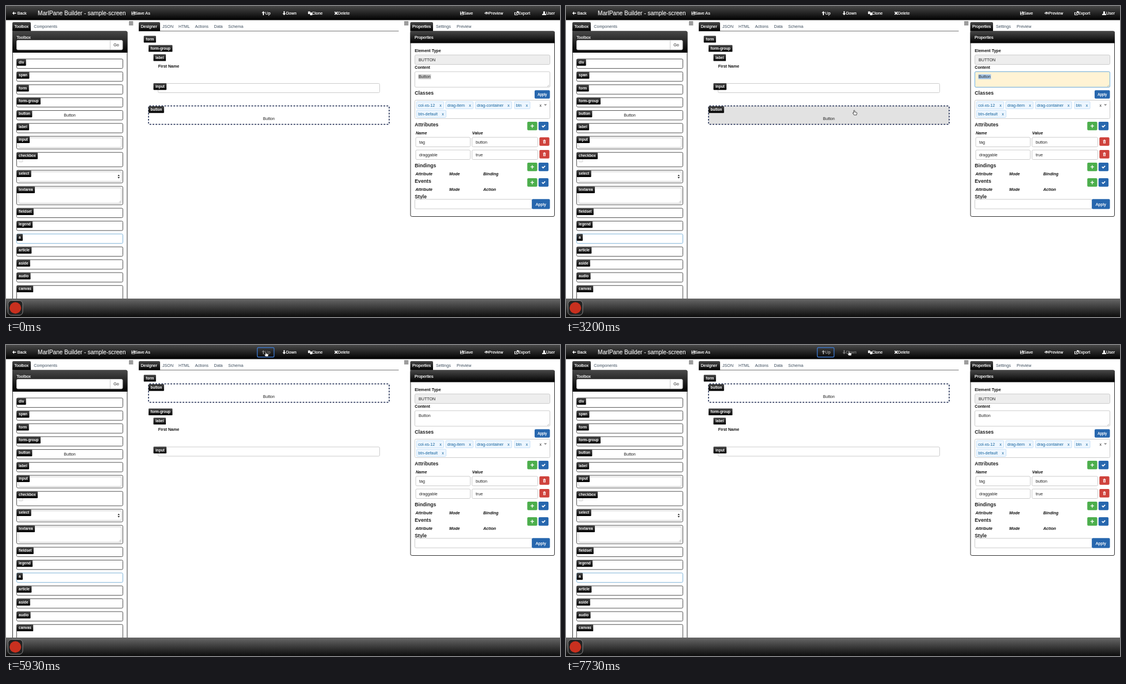
Write an HTML page that moves like this. It is 960 px wide and 540 px high and loops after 8 s.

```html
<!DOCTYPE html>
<html lang="en">
<head>
<meta charset="utf-8">
<title>Screen designer</title>
<style>
html, body { margin: 0; width: 100%; height: 100%; overflow: hidden; background: #fff; }
svg { display: block; width: 960px; height: 540px; }
text { font: 7.15px "Liberation Sans", Arial, sans-serif; fill: #222; white-space: pre; }
.white { fill: #fff; stroke: #fff; stroke-width: .2px; }
.title { font-size: 10.1px; fill: #fff; stroke: #fff; stroke-width: .1px; }
.tab { fill: #3c4c5c; }
.bold { font-weight: bold; font-size: 7.05px; fill: #111; }
.head { font-weight: bold; font-size: 8.7px; }
.col { font: italic bold 7.1px "Liberation Sans", Arial, sans-serif; fill: #111; }
.tag { font: bold 6.4px "Liberation Sans", Arial, sans-serif; fill: #fff; }
.chip { fill: #14639c; }
.mid { text-anchor: middle; }
.small { font-size: 6.4px; }
</style>
</head>
<body>
<svg id="stage" viewBox="0 0 960 540"></svg>
<script>
const pen = document.createElement('canvas').getContext('2d');
pen.font = 'bold 6.4px "Liberation Sans", Arial, sans-serif';

const text = (x, y, s, cls = '') => `<text x="${x}" y="${y}" class="${cls}">${s}</text>`;
const rect = (x, y, w, h, fill, stroke = 'none', r = 0, more = '') =>
  `<rect x="${x}" y="${y}" width="${w}" height="${h}" rx="${r}" fill="${fill}" stroke="${stroke}" ${more}/>`;
const path = (d, fill = 'none', stroke = 'none', more = '') =>
  `<path d="${d}" fill="${fill}" stroke="${stroke}" ${more}/>`;
const field = (x, y, w, h, fill = '#fff') => rect(x, y, w, h, fill, '#ccc', 2);
const group = (id, body, more = '') => `<g id="${id}" ${more}>${body}</g>`;
const dashed = (x, y, w, h, color, fill = 'none') =>
  rect(x, y, w, h, fill, color, 1.5, 'stroke-width="1.5" stroke-dasharray="3 2.2"');
const label = (x, y, s) =>
  rect(x, y, pen.measureText(s).width + 7, 11.8, 'url(#dark)', 'none', 1.2) + text(x + 3.6, y + 8, s, 'tag');
const tab = (x, w, s) =>
  path(`M${x} 43.5v-13.5q0-2 2-2h${w - 4}q2 0 2 2v13.5z`, 'url(#dark)') + text(x + 3.4, 38, s, 'white');

// Icons are drawn in a box of about 7 by 7.
const icons = {
  left: 'M0 3.5L3 .6V2.7H6.5V4.3H3V6.4z',
  up: 'M3 0L6 3.2H3.9V7H2.1V3.2H0z',
  down: 'M3 7L0 3.8H2.1V0H3.9V3.8H6z',
  save: 'M0 .5H1V3H4.4V.5H5L6 1.5V6.5H0zM2.8 .5H3.9V2.4H2.8zM1 4.2V5.7H5V4.2z',
  clone: 'M0 .5H3L4 1.5V2H3V5H0zM3.4 2.2H6L7.2 3.4V7H3.4z',
  cross: 'M1.2 .5L3 2.3L4.8 .5L6 1.7L4.2 3.5L6 5.3L4.8 6.5L3 4.7L1.2 6.5L0 5.3L1.8 3.5L0 1.7z',
  eye: 'M0 3.5Q3.7-.9 7.4 3.5Q3.7 7.7 0 3.5zM1.3 3.5Q3.7 6.4 6.1 3.5Q5.5 2.6 4.8 2.2Q5 4.4 3.7 4.4Q2.3 4.4 2.6 2.2Q1.9 2.6 1.3 3.5z',
  share: 'M0 2H2V3H1V5.8H5V4.6H6V6.8H0zM3.6 0H7V3.4L5.9 2.3L3.4 4.8L2.3 3.7L4.8 1.2z',
  user: 'M3.5 .2C6 .2 5 3 4.5 3.8L7 5.2V6.7H0V5.2L2.5 3.8C2 3 1 .2 3.5 .2z',
  plus: 'M2.3 0H3.7V2.3H6V3.7H3.7V6H2.3V3.7H0V2.3H2.3z',
  check: 'M0 3.2L1.2 2L2.6 3.4L5.4 .6L6.6 1.8L2.6 5.7z',
  trash: 'M0 .9H1.7V0H3.3V.9H5V1.7H0zM.5 2.2H4.5V6.5H.5zM1.4 3V5.7H1.9V3zM2.3 3V5.7H2.7V3zM3.1 3V5.7H3.6V3z'
};
const icon = (name, x, y) =>
  path(icons[name], '#fff', 'none', `fill-rule="evenodd" transform="translate(${x} ${y})"`);
const action = (name, ix, tx, s) => icon(name, ix, 9) + text(tx, 15.2, s, 'white');
const burger = x => path(`M${x} 27.2h7.4m-7.4 1.9h7.4m-7.4 1.9h7.4m-7.4 1.9h7.4`, 'none', '#444');

function topBar() {
  return rect(0, 0, 960, 24.5, 'url(#dark)') +
    text(55, 16, 'MarlPane Builder - sample-screen', 'title') +
    action('left', 11, 19.8, 'Back') + action('save', 217.5, 223.5, 'Save As') +
    group('up', action('up', 443, 449.3, 'Up')) + group('down', action('down', 479, 485.2, 'Down')) +
    action('clone', 523.5, 530, 'Clone') + action('cross', 569, 575, 'Delete') +
    action('save', 787, 793, 'Save') + action('eye', 829, 836, 'Preview') +
    action('share', 881, 887.5, 'Export') + action('user', 929, 936, 'User') +
    group('focus', rect(435.5, 4.5, 29, 16.5, 'none', '#3b73c4', 2, 'stroke-width="1.4"'));
}

function toolbox() {
  const names = 'div span form form-group button label input checkbox select textarea fieldset legend a article aside audio canvas'.split(' ');
  const tall = { input: 22, checkbox: 25, select: 22, textarea: 32, canvas: 30 };
  let y = 92, out = rect(11.5, 44, 198.5, 480, '#fff', '#333', 2) +
    path('M11 81V43.5H208q2.5 0 2.5 2.5V81z', 'url(#dark)') +
    tab(11, 32, 'Toolbox') + text(48.3, 38, 'Components', 'tab') + burger(213) +
    text(18.3, 56.5, 'Toolbox', 'white') + rect(18.5, 59.5, 183.5, 16.5, '#fff', '#ccc', 2) +
    path('M180.5 59.5v16.5', 'none', '#ccc') + text(186.3, 70.3, 'Go');
  for (const name of names) {
    const h = tall[name] || 16.4;
    out += rect(18.5, y, 184, h, '#fff', name === 'a' ? '#7fb4d8' : '#555', 2);
    if (/input|select|textarea/.test(name)) out += field(22, y + 2.7, 178, h - 5.4);
    if (name === 'button') out += text(110.5, y + 11, 'Button', 'mid');
    if (name === 'checkbox') out += rect(22.5, y + 10.5, 6.5, 6, '#fff', '#ccc', 1);
    if (name === 'select') out += path(`M193.5 ${y + 10.2}l1.8-2.6 1.8 2.6zm0 1.6l1.8 2.6 1.8-2.6z`, '#222');
    if (name === 'textarea') out += path(`M196 ${y + 28}l3-3m-1.3 3l1.3-1.3`, 'none', '#999', 'stroke-width=".6"');
    out += label(18.5, y, name);
    y += h + 5.97;
  }
  return out;
}

function designer() {
  const tabs = [[271, 'JSON'], [299, 'HTML'], [327.5, 'Actions'], [360.5, 'Data'], [385, 'Schema']];
  return path('M230 43.5H680.5', 'none', '#777') + tab(230, 37, 'Designer') + burger(690) +
    tabs.map(([x, s]) => text(x, 38, s, 'tab')).join('') +
    group('formHover', dashed(238.5, 51.5, 434, 164.5, '#2186c0')) + label(238.7, 51.8, 'form') +
    group('fields',
      label(247, 67.8, 'form-group') + label(255.5, 83.8, 'label') +
      text(263.7, 106.5, 'First Name', 'bold') +
      field(263.5, 134.5, 384, 16) + label(255.5, 134, 'input')) +
    group('button',
      group('buttonHover', rect(247, 173.5, 417, 32, '#e2e2e2')) +
      dashed(247, 173.5, 417, 32, '#1c2a50') + label(247, 174, 'button') +
      text(455.5, 198.2, 'Button', 'mid'));
}

function properties() {
  const square = (x, y, color, name, dx, dy) => rect(x, y, 17.3, 14.8, color, 'none', 1.8) + icon(name, x + dx, y + dy);
  const pair = y => square(903.3, y, '#4cae4c', 'plus', 5.6, 4.4) + square(922.8, y, '#2767ae', 'check', 5.4, 4.5);
  const chip = (x, y, w, s) => rect(x, y, w, 12.5, '#edf6ff', '#c8e2f8', 1) +
    text(x + 2.7, y + 8.6, s, 'chip') + text(x + w - 7.2, y + 8.6, 'x', 'chip');
  const columns = (y, last) => text(709.5, y, 'Attribute', 'col') + text(768, y, 'Mode', 'col') + text(827, y, last, 'col');
  const row = (y, name, value) => field(710, y, 94.5, 16.5) + field(807.5, y, 114, 16.5) +
    text(716, y + 11, name) + text(814, y + 11, value) + square(924.3, y, '#cf433d', 'trash', 6.2, 4);
  return rect(701, 44, 249.5, 321.5, '#fff', '#333', 2.5) +
    path('M700.5 64.5V43.5H948.5q2.5 0 2.5 2.5V64.5z', 'url(#dark)') +
    tab(700.5, 39.5, 'Properties') + text(745, 38, 'Settings', 'tab') + text(781, 38, 'Preview', 'tab') +
    text(708, 56.6, 'Properties', 'white') +
    text(708.3, 79.5, 'Element Type', 'bold') + field(708.5, 85, 234, 16.5, '#eee') + text(715, 95.6, 'BUTTON') +
    text(708.3, 109, 'Content', 'bold') + field(708.5, 114, 234, 27) +
    group('idleMark', rect(714.5, 118.5, 22, 8.6, '#ccc')) +
    group('editing', rect(708.5, 114, 234, 27, '#fff3d4', '#6fb2e4', 2) + rect(714.5, 118.5, 22, 8.6, '#a9c8ea')) +
    text(715, 125.2, 'Button') + path('M938 140l3-3m-1.3 3l1.3-1.3', 'none', '#999', 'stroke-width=".6"') +
    text(708.3, 154, 'Classes', 'head') + rect(916, 146.3, 26.5, 14.4, '#2767ae', 'none', 1.8) +
    text(929.2, 156, 'Apply', 'white mid small') +
    field(708.5, 163.5, 234, 32) +
    chip(711.5, 166, 47, 'col-xs-12') + chip(762, 166, 47.5, 'drag-item') + chip(813.3, 166, 63, 'drag-container') +
    chip(881, 166, 27, 'btn') + chip(711.5, 181, 51, 'btn-default') +
    text(924.5, 174.5, 'x') + path('M932 170.5h5.4l-2.7 2.8z', '#888') +
    text(708.3, 209, 'Attributes', 'head') + pair(201) +
    text(710, 223, 'Name', 'col') + text(807.7, 223, 'Value', 'col') +
    row(228, 'tag', 'button') + row(250, 'draggable', 'true') +
    text(708.3, 280, 'Bindings', 'head') + pair(272) + columns(294, 'Binding') +
    text(708.3, 307, 'Events', 'head') + pair(299) + columns(321, 'Action') +
    text(708.3, 334, 'Style', 'head') + field(708.5, 335.7, 203, 16.5) +
    rect(911.2, 335.2, 31.3, 17.3, '#2767ae', 'none', 1.8) + text(926.8, 346.6, 'Apply', 'white mid');
}

const bottomBar = () => rect(0, 508, 960, 32, 'url(#foot)') +
  rect(3.5, 511.5, 25.5, 25.5, '#222', '#888', 6) + '<circle cx="16.2" cy="524.2" r="10" fill="#c8301f"/>';

const arrowShape = 'M0 0V7.3L1.6 5.8L2.8 8.5L4.1 7.9L2.9 5.3H5z';
const handShape = 'M-.8 .7Q0-.5 .8 .7V3.2L3.8 3.8Q4.9 4.1 4.7 5.3L4 8.4H-.5L-2.6 5Q-2.4 3.9-.8 5z';

const $ = id => document.getElementById(id);
$('stage').innerHTML = `<defs>
  <linearGradient id="dark" x2="0" y2="1"><stop stop-color="#484848"/><stop offset="1"/></linearGradient>
  <linearGradient id="foot" x2="0" y2="1"><stop stop-color="#686868"/><stop offset="1" stop-color="#0c0c0c"/></linearGradient>
  </defs>` + topBar() + toolbox() + designer() + properties() + bottomBar() +
  group('cursor',
    group('arrow', path(arrowShape, '#111', '#fff', 'stroke-width=".6"')) +
    group('hand', path(handShape, '#fff', '#222', 'stroke-width=".8"')));

// Pointer tip: time, x, y
const route = [
  [530, 432, 513], [730, 502, 361], [1060, 502, 361], [1330, 485, 295], [1730, 502.5, 191],
  [2190, 502.5, 191], [2400, 500.5, 184], [3190, 500.5, 184], [3600, 458, 52.5], [4000, 451, 11],
  [5930, 451, 11], [6270, 363, 74], [6530, 356, 82], [6660, 356, 82], [7400, 490.3, 10], [8000, 490.3, 10]
];
const ramp = (t, from, to) => Math.min(1, Math.max(0, (t - from) / (to - from)));
const within = (t, ...spans) => spans.some(([from, to]) => t >= from && t < to);
const show = (id, on) => $(id).setAttribute('opacity', +on);
const move = (id, x, y) => $(id).setAttribute('transform', `translate(${x} ${y})`);

function pointer(t) {
  const i = Math.max(1, route.findIndex(p => p[0] >= t));
  const [a, b] = [route[i - 1], route[i]], k = ramp(t, a[0], b[0]);
  return [a[1] + (b[1] - a[1]) * k, a[2] + (b[2] - a[2]) * k];
}

function draw(now) {
  const t = Math.floor((now % 8000 + 4) * 15 / 1000) * 1000 / 15;
  const moved = t > 4860;
  const overButton = within(t, [2190, 3260], [6190, 6700]);
  const hand = overButton || within(t, [4060, 5960], [7390, 8000]);

  move('fields', 0, moved ? 42.5 : 0);
  move('button', 0, moved ? -106 : 0);
  show('formHover', within(t, [3520, 3640], [6060, 6190]));
  show('buttonHover', overButton ? ramp(t, 2130, 2390) : 0);
  show('idleMark', t < 2330);
  show('editing', ramp(t, 2130, 2390) * (1 - ramp(t, 4800, 5000)));
  show('focus', ramp(t, 4800, 5000));

  const upHover = ramp(t, 3930, 4130) * (1 - ramp(t, 5930, 6130));
  show('up', 1 - .58 * upHover - .4 * ramp(t, 5930, 6130));
  show('down', 1 - .6 * ramp(t, 7330, 7670));

  move('cursor', ...pointer(t));
  show('cursor', t > 530);
  show('arrow', !hand);
  show('hand', hand);
}

const start = performance.now();
function tick() {
  draw(performance.now() - start);
  requestAnimationFrame(tick);
}
tick();
</script>
</body>
</html>
```
